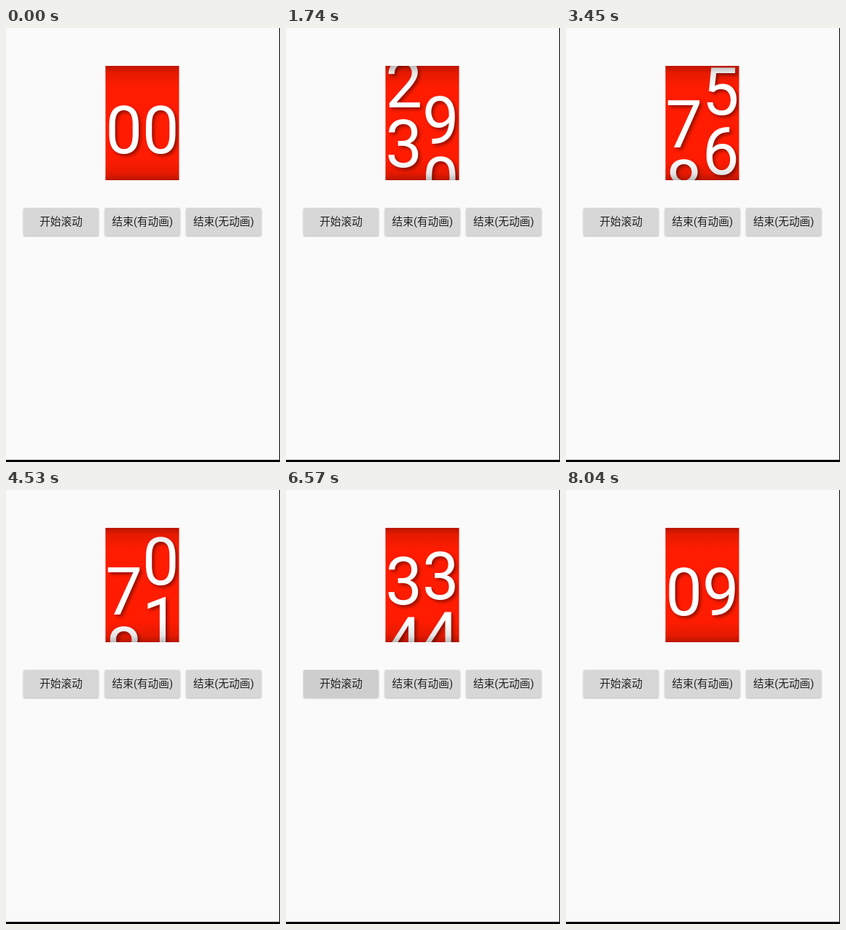
Write an HTML page that moves like this. It is 376 px wide and 596 px high and loops after 8280 ms.

```html
<!DOCTYPE html>
<html lang="zh">
<head>
<meta charset="utf-8">
<style>
  html, body { margin: 0; width: 100%; height: 100%; overflow: hidden; background: #fbfafa; }
  svg { display: block; }
  .digits { font: 90px Roboto, sans-serif; fill: #fff; filter: drop-shadow(3px 3px 2px rgba(0, 0, 0, .4)); }
  .button rect { fill: #d6d7d7; filter: drop-shadow(0 1px 1px rgba(0, 0, 0, .28)); }
  .button text { font: 14.67px Roboto, "Noto Sans CJK SC", "Noto Sans CJK", sans-serif; fill: #212121; text-anchor: middle; }
</style>
</head>
<body>
<svg width="376" height="596" viewBox="0 0 376 596">
  <defs>
    <clipPath id="window"><rect x="136.5" y="52" width="101" height="157"/></clipPath>
    <linearGradient id="shade" x2="0" y2="1">
      <stop offset="0" stop-opacity=".27"/>
      <stop offset=".06" stop-opacity=".1"/>
      <stop offset=".19" stop-opacity="0"/>
      <stop offset=".81" stop-opacity="0"/>
      <stop offset=".94" stop-opacity=".1"/>
      <stop offset="1" stop-opacity=".27"/>
    </linearGradient>
  </defs>
  <g clip-path="url(#window)">
    <rect x="136" y="52" width="102" height="157" fill="#ff1c00"/>
    <g class="digits">
      <text x="136.5"></text><text x="136.5"></text>
      <text x="187"></text><text x="187"></text>
    </g>
    <rect x="136" y="52" width="102" height="157" fill="url(#shade)"/>
  </g>
  <g class="button"><rect x="24" y="247" width="103" height="38" rx="2"/><text x="75.5" y="271">开始滚动</text></g>
  <g class="button"><rect x="135.7" y="247" width="103" height="38" rx="2"/><text x="187.3" y="271">结束(有动画)</text></g>
  <g class="button"><rect x="247.3" y="247" width="103" height="38" rx="2"/><text x="298.6" y="271">结束(无动画)</text></g>
  <path d="M375 0h1v596H0v-3h375z"/>
</svg>
<script>
const LOOP = 8280, STEP = 30, ROW = 82.3, BASELINE = 172;
const SPEED = 0.00923;                 // rows per ms, first column
const RESTART = 6373, JUMP = 7470;
const texts = document.querySelectorAll('.digits text');
const buttons = document.querySelectorAll('.button rect');
const taps = [[957, RESTART], [4780], [7440]];

// Rows rolled by the first column over time during the first run
const run = [[957, 0], [1740, 7.23], [2790, 16.88], [3450, 22.9], [4530, 32.99], [5831, 45]];

function rolled(t) {
  if (t <= run[0][0]) return 0;
  for (let i = 1; i < run.length; i++) {
    const [t0, a] = run[i - 1], [t1, b] = run[i];
    if (t < t1) return a + (b - a) * (t - t0) / (t1 - t0);
  }
  return 45;
}

function positions(t) {
  if (t >= JUMP) return [0, 9];
  if (t >= RESTART) {
    const rows = (t - RESTART) * SPEED;
    return [5 - rows, 6 - rows * 1.5];
  }
  const rows = rolled(t);
  return [-rows, -Math.min(rows * 1.5, 54)];
}

// The current digit and, while rolling, the one below it
function drawColumn(col, pos) {
  const base = Math.floor(pos), part = pos - base;
  for (let i = 0; i < 2; i++) {
    const text = texts[col * 2 + i];
    text.textContent = i && !part ? '' : ((base + i) % 10 + 10) % 10;
    text.setAttribute('y', BASELINE + (i - part) * ROW);
  }
}

function ripple(age) {
  return age < 0 ? 0 : Math.max(0, Math.min(1, age / 75, (375 - age) / 150));
}

function draw(now) {
  const t = Math.floor(now % LOOP / STEP) * STEP;
  positions(t).forEach((pos, col) => drawColumn(col, pos));
  buttons.forEach((rect, i) => {
    const press = Math.max(...taps[i].map(start => ripple(t - start)));
    const v = 214.5 - 9 * press;
    rect.style.fill = `rgb(${v}, ${v}, ${v})`;
  });
}

let start;
function tick(now) {
  start ??= now;
  draw(now - start);
  requestAnimationFrame(tick);
}
draw(0);
requestAnimationFrame(tick);
</script>
</body>
</html>
```
